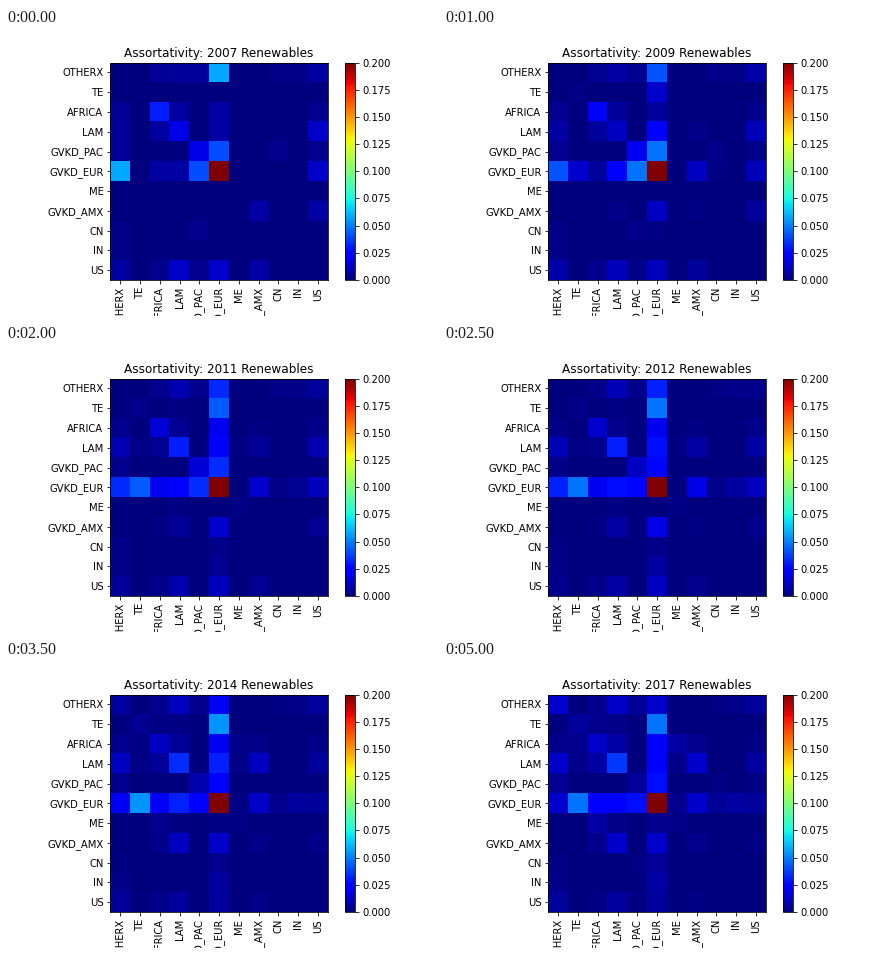
Animation of 432 by 288 pixels, one loop 5500 ms. Source, as a matplotlib script:

```python
import matplotlib.pyplot as plt
import numpy as np
from matplotlib.animation import FuncAnimation

REGIONS = ["OTHERX", "TE", "AFRICA", "LAM", "GVKD_PAC", "GVKD_EUR",
           "ME", "GVKD_AMX", "CN", "IN", "US"]
OTH, TE, AFR, LAM, PAC, EUR, ME, AMX, CN, IN, US = range(len(REGIONS))
FIRST, LAST = 2007, 2017
SURVEYS = [2007, 2009, 2010, 2012, 2014, 2016, 2017]

# Shares in thousandths: seven values follow SURVEYS, fewer are evenly spaced.
TRENDS = {
    (OTH, OTH): (0, 0, 14),
    (OTH, AFR): (4, 2, 3),
    (OTH, LAM): (5, 10, 13),
    (OTH, PAC): (5, 2, 4),
    (OTH, EUR): (58, 42, 34, 32, 21, 20, 14),
    (OTH, CN): (2, 1),
    (OTH, IN): (2, 2),
    (OTH, US): (6, 8, 3, 6, 5),
    (TE, TE): (0, 2, 5),
    (TE, AFR): (0, 0, 3),
    (TE, LAM): (0, 2),
    (TE, EUR): (0, 14, 38, 48, 54, 47, 48),
    (AFR, AFR): (31, 16, 12, 13),
    (AFR, LAM): (6, 3, 7),
    (AFR, EUR): (7, 5, 20, 20, 21, 21, 22),
    (AFR, ME): (0, 0, 7),
    (AFR, AMX): (0, 3),
    (AFR, US): (3, 1),
    (LAM, LAM): (18, 12, 31, 31, 34, 33, 36),
    (LAM, EUR): (7, 23, 16, 28, 32, 28, 22),
    (LAM, ME): (0, 2),
    (LAM, AMX): (0, 3, 11, 14),
    (LAM, US): (13, 9, 5, 6),
    (PAC, PAC): (18, 20, 12, 7, 5),
    (PAC, EUR): (40, 48, 42, 26, 24, 20, 28),
    (PAC, CN): (3, 0, 1),
    (PAC, US): (3, 0, 1),
    (EUR, EUR): (250, 250),
    (EUR, ME): (0, 0, 3),
    (EUR, AMX): (0, 12, 9, 18, 13, 18, 14),
    (EUR, CN): (0, 2, 4),
    (EUR, IN): (0, 0, 6, 6, 7),
    (EUR, US): (13, 10, 11, 4, 5),
    (ME, ME): (0, 2),
    (AMX, AMX): (7, 0, 1, 2, 3),
    (AMX, US): (7, 3, 1),
}


def shares(year):
    grid = np.zeros((len(REGIONS), len(REGIONS)))
    for (a, b), points in TRENDS.items():
        if len(points) == len(SURVEYS):
            knots = SURVEYS
        else:
            knots = np.linspace(FIRST, LAST, len(points))
        grid[a, b] = grid[b, a] = np.interp(year, knots, points) / 1000
    return grid


fig, ax = plt.subplots(figsize=(6, 4), dpi=72)
fig.subplots_adjust(left=0.125, right=0.9, bottom=0.125, top=0.88)
image = ax.imshow(shares(FIRST), cmap="jet", vmin=0, vmax=0.2,
                  interpolation="nearest")
fig.colorbar(image, ticks=np.linspace(0, 0.2, 9), format="%.3f")
ax.set_xticks(range(len(REGIONS)), REGIONS, rotation=90)
ax.set_yticks(range(len(REGIONS)), REGIONS)
title = ax.set_title("")


def update(i):
    year = FIRST + i
    image.set_data(shares(year))
    title.set_text(f"Assortativity: {year} Renewables")
    return image, title


anim = FuncAnimation(fig, update, frames=LAST - FIRST + 1, interval=500,
                     repeat=True, repeat_delay=0)
plt.show()
```
